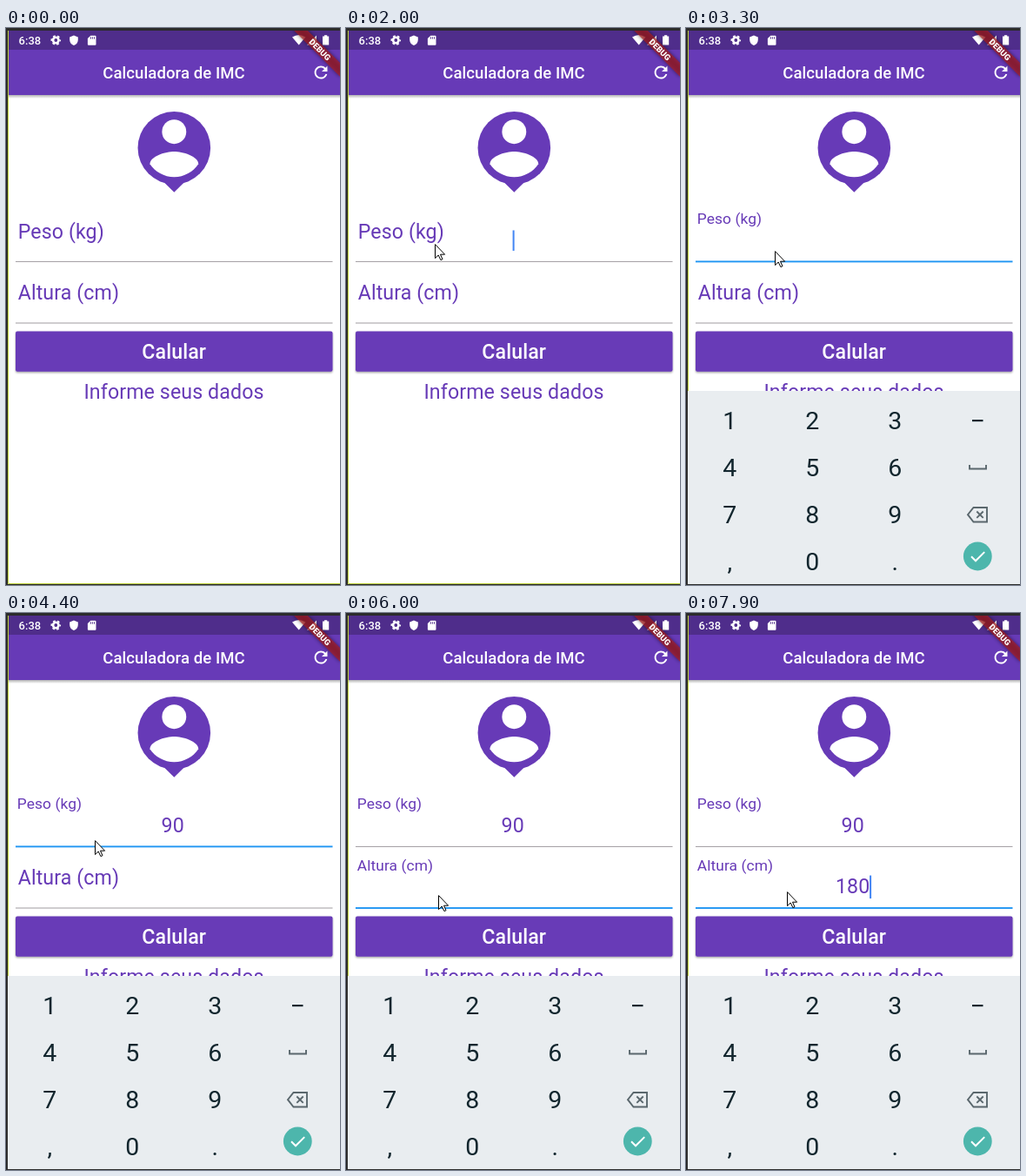
These frames come from a looping animation (384 px wide and 640 px high, 8000 ms). An HTML page:

```html
<!DOCTYPE html>
<html lang="pt">
<head>
<meta charset="utf-8">
<title>Calculadora de IMC</title>
<style>
html, body { margin: 0; width: 100%; height: 100%; overflow: hidden; background: #fff; }
svg { display: block; width: 384px; height: 640px; font-family: Roboto, "Noto Sans", sans-serif; }
.mid { text-anchor: middle; }
.med { font-weight: 500; }
.purple { fill: #673ab7; }
.white { fill: #fff; }
.big { font-size: 23.2px; letter-spacing: .1px; }
</style>
</head>
<body>
<svg viewBox="0 0 384 640">
  <defs>
    <clipPath id="view"><rect id="viewBox" width="384" height="640"/></clipPath>
    <filter id="soft" x="-20%" y="-80%" width="140%" height="260%"><feGaussianBlur stdDeviation="2"/></filter>
    <filter id="drop" x="-5%" y="-20%" width="110%" height="150%"><feDropShadow dx="0" dy="1.2" stdDeviation="1.2" flood-opacity=".4"/></filter>
    <linearGradient id="fade" x2="0" y2="1"><stop stop-opacity=".3"/><stop offset="1" stop-opacity="0"/></linearGradient>
  </defs>
  <rect width="384" height="640" class="white"/>

  <!-- app bar -->
  <rect x="2" y="77" width="382" height="4" fill="url(#fade)"/>
  <rect x="2" y="3" width="382" height="74" class="purple"/>
  <rect x="2" y="3" width="382" height="22" fill="#4f2d8b"/>
  <text x="193" y="58" class="mid med white" font-size="18.57" letter-spacing=".06">Calculadora de IMC</text>
  <path transform="translate(350.9 39.9) scale(.929)" class="white" d="M17.65 6.35C16.2 4.9 14.21 4 12 4c-4.42 0-7.99 3.58-7.99 8s3.57 8 7.99 8c3.73 0 6.84-2.55 7.73-6h-2.08c-.82 2.33-3.04 4-5.65 4-3.31 0-6-2.69-6-6s2.69-6 6-6c1.66 0 3.14.69 4.22 1.78L13 11h7V4z"/>

  <!-- status bar -->
  <g class="white">
    <text x="14.6" y="18.8" class="med" font-size="13">6:38</text>
    <g fill="none" stroke="#fff">
      <circle cx="57.3" cy="14" r="3.2" stroke-width="2.6"/>
      <circle cx="57.3" cy="14" r="5" stroke-width="1.6" stroke-dasharray="2.6 2.636" stroke-dashoffset="1.3"/>
    </g>
    <path d="M78 8.4l4.8 2v3.3c0 3-2 5.3-4.8 6.2-2.8-.9-4.8-3.2-4.8-6.2v-3.3z"/>
    <path d="M97.3 8.7h5.2q1 0 1 1v9q0 1-1 1h-7.6q-1 0-1-1v-6.6z"/>
    <path d="M97.3 10.3v2.3M99.4 10.3v2.3M101.5 10.3v2.3" stroke="#4f2d8b"/>
    <path d="M329 10.6q7.7-5 15.4 0l-7.7 9z"/>
    <path d="M346 19.6h11v-11z"/>
    <path d="M366 8.3h3.2v1.3h2v10h-7.2v-10h2z"/>
  </g>

  <!-- debug ribbon -->
  <g transform="translate(383.3 2.6) rotate(45)">
    <rect x="-38" y="26" width="76" height="11.1" opacity=".5" filter="url(#soft)"/>
    <rect x="-38" y="26" width="76" height="11.1" fill="#b71c1c" fill-opacity=".627"/>
    <text y="35" class="mid white" font-size="9.5" font-weight="900">DEBUG</text>
  </g>

  <!-- form -->
  <g transform="translate(137.6 86.7) scale(4.643)">
    <circle class="purple" cx="12" cy="11" r="9"/>
    <path class="purple" d="M9 19l3 3 3-3z"/>
    <circle class="white" cx="12" cy="7" r="3"/>
    <path class="white" d="M12 18.2c-2.5 0-4.71-1.28-6-3.22.03-1.99 4-3.08 6-3.08s5.97 1.09 6 3.08c-1.29 1.94-3.5 3.22-6 3.22z"/>
  </g>
  <g class="purple big">
    <text id="label0">Peso (kg)</text>
    <text id="label1">Altura (cm)</text>
    <text id="value0" class="mid" x="191.7" y="251.5"></text>
    <text id="value1" class="mid" x="191.7" y="322.1"></text>
  </g>
  <rect id="line0" x="11" width="364.5"/>
  <rect id="line1" x="11" width="364.5"/>
  <rect id="caret" width="2" fill="#4285f4"/>
  <rect x="11" y="348.6" width="364.5" height="46.2" rx="2" class="purple" filter="url(#drop)"/>
  <text x="193.2" y="380" class="mid med white big">Calular</text>
  <g clip-path="url(#view)">
    <text x="193" y="426.3" class="mid purple big">Informe seus dados</text>
  </g>

  <!-- window edges -->
  <path d="M2.5 3V638.5H384" fill="none" stroke="#bfd23c"/>

  <g id="keys">
    <rect x="2" y="417" width="382" height="224" fill="#e9edf0"/>
    <g id="digits" class="mid" font-size="28.5" fill="#12262e"></g>
    <rect x="329" y="450" width="12.5" height="2.2" fill="#12262e"/>
    <g fill="none" stroke="#5a676d" stroke-width="1.9">
      <path d="M326 502v4.5h19V502"/>
      <path d="M330.5 551H346v16.5H330.5L324 559.2zM334.3 555.5l7.4 7.4M341.7 555.5l-7.4 7.4"/>
    </g>
    <circle cx="335.3" cy="607" r="16.4" fill="#4db6ac"/>
    <path d="M328 607.3l5 5 10.2-10.2" fill="none" stroke="#fff" stroke-width="2"/>
  </g>
  <path d="M0 0H384V3H2V640H0z" fill="#2b2b2b"/>
  <rect y="639" width="384" height="1" fill="#2b2b2b"/>

  <path id="mouse" d="M.5.6V16.6L4.2 13 6.9 18.6 9 17.7 6.5 12.2H11.6z" fill="#fff" stroke="#000" stroke-linejoin="round"/>
</svg>
<script>
const LOOP = 8000, STEP = 100, BLINK = 500, ROW = 70.6;
const ENTER = 500, CARET = 2000, KEYBOARD = 2500;

const fields = [
  { tap: 1800, from: 2000, to: 2100, text: "90", keys: [3800, 3900] },
  { tap: 5100, from: 5000, to: 5300, text: "180", keys: [6300, 6400, 6600] }
];
// Pointer moves; bend swings the way sideways.
const moves = [
  { from: 500, to: 1200, x: 108, y: 228, bend: 85 },
  { from: 1300, to: 1500, x: 102, y: 248 },
  { from: 2000, to: 2100, x: 102, y: 256 },
  { from: 4300, to: 4900, x: 106, y: 324 },
  { from: 6700, to: 6800, x: 108, y: 326 },
  { from: 7700, to: 7900, x: 116, y: 320 }
];

const $ = id => document.getElementById(id);
const set = (id, attrs) => { for (const k in attrs) $(id).setAttribute(k, attrs[k]); };
const mix = (a, b, p) => a + (b - a) * p;
const part = (t, { from, to }) => Math.min(1, Math.max(0, (t - from) / (to - from)));
const easeOut = p => Math.sin(p * Math.PI / 2);
const smooth = p => p * p * (3 - 2 * p);
const count = (f, t) => f.keys.filter(k => k <= t).length;

["123", "456", "789", ",0."].forEach((row, r) => [...row].forEach((ch, c) => {
  const key = document.createElementNS("http://www.w3.org/2000/svg", "text");
  key.textContent = ch;
  key.setAttribute("x", 50.3 + c * 95);
  key.setAttribute("y", 461.3 + r * 54);
  $("digits").append(key);
}));

function drawFields(t) {
  const opened = fields.map(f => easeOut(part(t, f)));
  fields.forEach((f, i) => {
    const top = i * ROW, p = opened[i];
    const focus = p * (1 - (opened[i + 1] || 0)), thick = mix(1, 1.9, focus);
    set("label" + i, { transform: `translate(${mix(13.7, 12.8, p)} ${mix(241.7, 225.3, p) + top}) scale(${mix(1, .75, p)})` });
    set("line" + i, {
      y: 268.4 + top - thick / 2, height: thick,
      fill: `rgb(${mix(160, 33, focus)},${mix(155, 150, focus)},${mix(160, 243, focus)})`
    });
    $("value" + i).textContent = f.text.slice(0, count(f, t));
  });
}

// The blink starts over with every tap and key.
function drawCaret(t) {
  const active = t >= fields[1].tap ? 1 : 0, f = fields[active];
  const len = count(f, t), last = len ? f.keys[len - 1] : f.tap;
  const on = t >= CARET && Math.floor((t - last) / BLINK) % 2 === 0;
  const tall = len ? 26.5 : 23.5;
  set("caret", {
    x: 191.6 + len * 6.5, y: 244.2 + active * ROW - tall / 2, height: tall,
    opacity: on ? 1 : 0
  });
}

function drawKeys(t) {
  const open = t >= KEYBOARD, rising = t < KEYBOARD + STEP;
  set("keys", {
    visibility: open ? "visible" : "hidden",
    transform: `translate(0 ${rising ? 8 : 0})`, opacity: rising ? .88 : 1
  });
  set("viewBox", { height: open ? 417 : 640 });
}

function drawMouse(t) {
  let x = 48, y = 0;
  for (const m of moves) {
    const p = smooth(part(t, m));
    x = mix(x, m.x, p) + (m.bend || 0) * Math.sin(p * Math.PI);
    y = mix(y, m.y, p);
  }
  set("mouse", { visibility: t >= ENTER ? "visible" : "hidden", transform: `translate(${Math.round(x)} ${Math.round(y)})` });
}

function draw(now) {
  const t = Math.floor(now % LOOP / STEP) * STEP;
  drawFields(t);
  drawCaret(t);
  drawKeys(t);
  drawMouse(t);
}

const start = performance.now();
function tick() {
  draw(performance.now() - start);
  requestAnimationFrame(tick);
}
tick();
</script>
</body>
</html>
```
